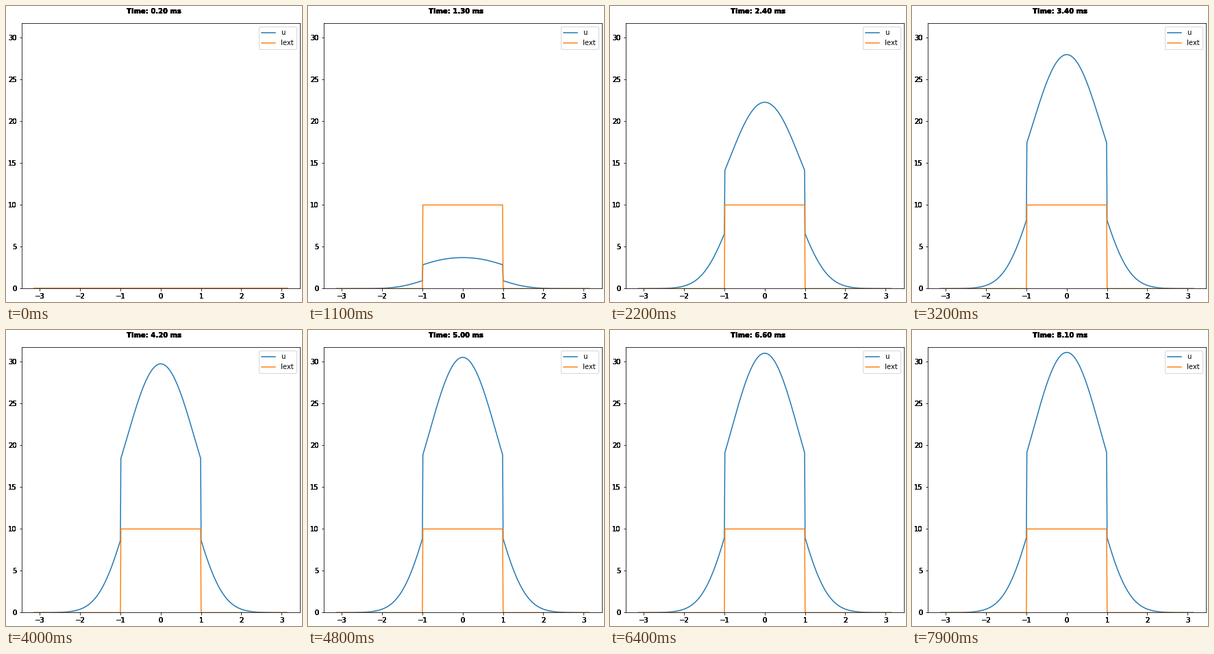
Animation of 432 by 432 pixels, one loop 8 s. Source, as a matplotlib script:

```python
import numpy as np
import matplotlib.pyplot as plt
from matplotlib.animation import FuncAnimation

SIZE, DPI = 432, 72
FRAMES, INTERVAL = 80, 100
ONSET = 9            # frame at which the input switches on
DT, TAU = 0.1, 1.0
N, K, A, J0, AMP = 512, 0.1, 0.5, 4.0, 10.0
OVERPRINT = 6        # repeated text gives hard, dark glyph edges

plt.rcParams.update({"font.family": "DejaVu Sans", "font.size": 10})

# Continuous attractor network on a ring with divisive inhibition
x = np.linspace(-np.pi, np.pi, N)
dist = np.abs(x[:, None] - x[None, :])
dist = np.minimum(dist, 2 * np.pi - dist)
kernel = J0 * np.exp(-0.5 * (dist / A) ** 2) / (np.sqrt(2 * np.pi) * A)
box = np.where(np.abs(x) <= 1, AMP, 0.0)


def simulate():
    u, states, inputs = np.zeros(N), [], []
    for i in range(FRAMES):
        ext = box if i >= ONSET else np.zeros(N)
        states.append(u)
        inputs.append(ext)
        rate = u ** 2 / (1 + K * np.sum(u ** 2))
        u = u + DT / TAU * (-u + kernel @ rate + ext)
    return states, inputs


states, inputs = simulate()

fig = plt.figure(figsize=(SIZE / DPI, SIZE / DPI), dpi=DPI, facecolor="white")
ax = fig.add_axes([22.7 / SIZE, 19.6 / SIZE, 406.3 / SIZE, 387 / SIZE])
ax.set_xlim(-1.1 * np.pi, 1.1 * np.pi)
ax.set_ylim(0, 31.72)
xticks, yticks = range(-3, 4), range(0, 31, 5)
ax.set_xticks(xticks, [""] * len(xticks))
ax.set_yticks(yticks, [""] * len(yticks))


def tick_text(px, py, value, placement):
    trans, va, ha = placement
    label = str(value).replace("-", "\u2212")
    for _ in range(OVERPRINT):
        ax.text(px, py, label, transform=trans, va=va, ha=ha)


for v in xticks:
    tick_text(v, 0, v, ax.get_xaxis_text1_transform(7))
for v in yticks:
    tick_text(0, v, v, ax.get_yaxis_text1_transform(7))

u_line, = ax.plot(x, states[0], label="u")
ext_line, = ax.plot(x, inputs[0], label="Iext")
ax.legend(loc="upper right")

titles = [fig.text(0.5, 1 - 3 / SIZE, "", ha="center", va="top", weight="bold")
          for _ in range(OVERPRINT)]


def update(i):
    u_line.set_ydata(states[i])
    ext_line.set_ydata(inputs[i])
    for t in titles:
        t.set_text(f"Time: {(i + 2) * DT:.2f} ms")
    return [u_line, ext_line, *titles]


anim = FuncAnimation(fig, update, frames=FRAMES, interval=INTERVAL,
                     repeat=True, repeat_delay=0, blit=False)
plt.show()
```
